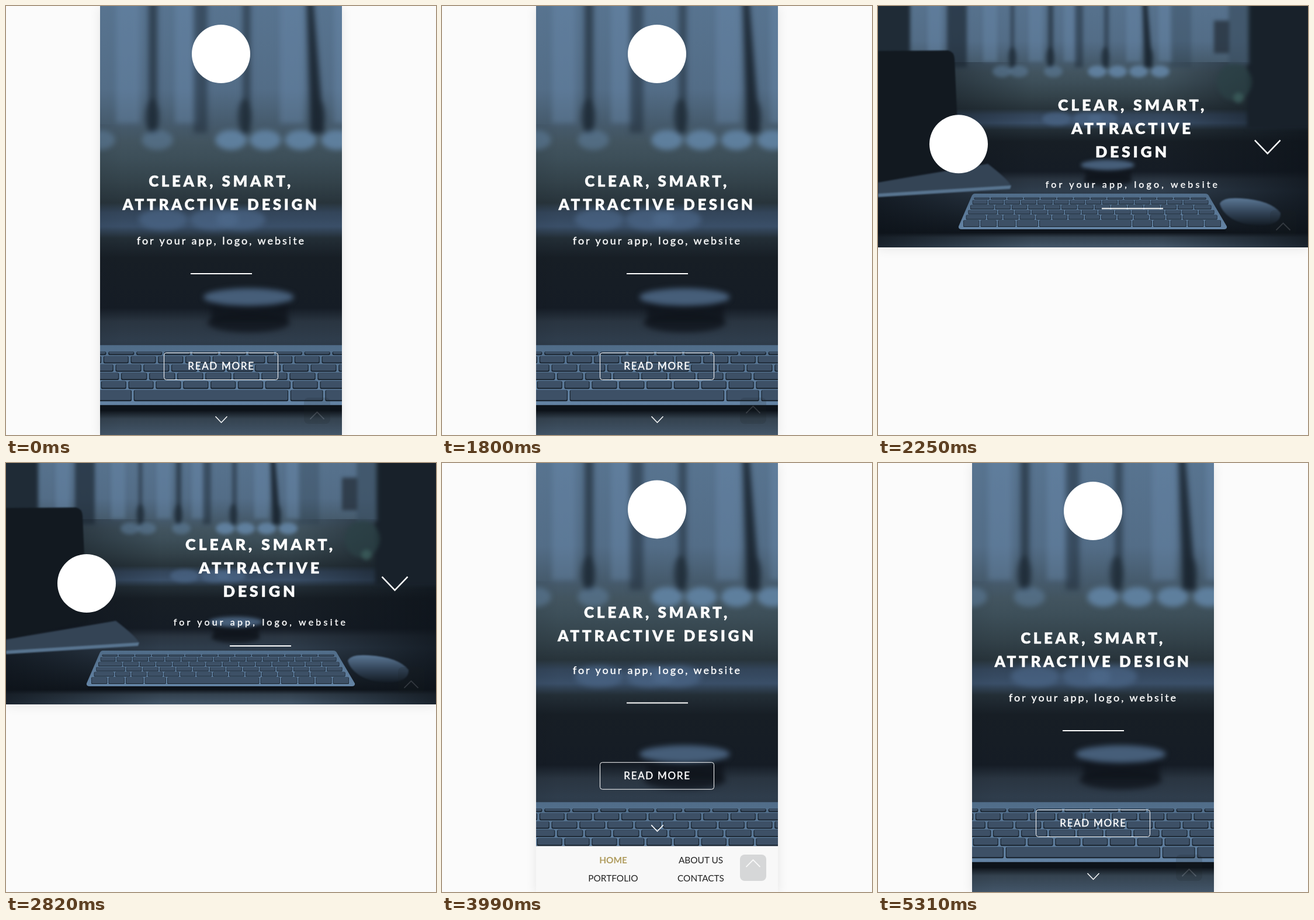
Recreate the animation shown at these times as an HTML page. Size 736 px wide and 734 px high, loop 5400 ms.

```html
<!DOCTYPE html>
<html lang="en">
<head>
<meta charset="utf-8">
<title>Responsive page</title>
<style>
  html, body { margin: 0; width: 100%; height: 100%; overflow: hidden; background: #fbfbfb; }
  #device { position: absolute; top: 0; overflow: hidden; background: #f8f8f8; box-shadow: 0 2px 18px rgba(0, 0, 0, .09); }
  #page { position: absolute; top: 0; display: block; }
  text { font-family: Lato, sans-serif; text-anchor: middle; fill: #fff; }
  .title, .sub, .more { stroke: #fff; stroke-width: .4px; }
  .title { font-weight: 900; letter-spacing: .175em; }
  .sub { font-size: 18px; letter-spacing: 3px; }
  .sub.wide { font-size: 16px; letter-spacing: 4.2px; }
  .more { font-size: 17px; letter-spacing: .1em; }
  .nav text { font-size: 15.4px; fill: #222; }
  .nav .on { font-weight: 700; fill: #b09c5e; }
  .head { font-size: 36px; font-weight: 700; letter-spacing: .2em; fill: #000; }
  .copy { font-size: 16.4px; font-weight: 300; fill: #444; }
  .stroke { fill: none; stroke: #fff; }
  filter { color-interpolation-filters: sRGB; }
</style>
</head>
<body>
<div id="device">
<svg id="page" width="736" height="734">
  <defs>
    <linearGradient id="wall" gradientUnits="userSpaceOnUse" x1="0" y1="-30" x2="0" y2="420"></linearGradient>
    <linearGradient id="sides">
      <stop offset="0" stop-color="#0d131a" stop-opacity=".75"/>
      <stop offset=".36" stop-color="#0d131a" stop-opacity="0"/>
      <stop offset=".66" stop-color="#0d131a" stop-opacity="0"/>
      <stop offset="1" stop-color="#0d131a" stop-opacity=".75"/>
    </linearGradient>
    <linearGradient id="shine" x2="0" y2="1">
      <stop offset="0" stop-color="#5b7795"/>
      <stop offset=".5" stop-color="#34465a"/>
      <stop offset="1" stop-color="#141c25"/>
    </linearGradient>
    <linearGradient id="board" x2="0" y2="1">
      <stop offset="0" stop-color="#506c88"/>
      <stop offset="1" stop-color="#6484a5"/>
    </linearGradient>
    <filter id="soft" filterUnits="userSpaceOnUse" x="-60" y="-90" width="860" height="570">
      <feGaussianBlur stdDeviation="3"/>
    </filter>
    <filter id="faint" filterUnits="userSpaceOnUse" x="-60" y="-90" width="860" height="570">
      <feGaussianBlur stdDeviation="1"/>
    </filter>
  </defs>

  <svg id="hero" width="736">
    <g id="photo">
      <rect x="-60" y="-90" width="860" height="570" fill="url(#wall)"/>
      <rect x="0" y="96" width="736" height="330" fill="url(#sides)"/>
      <g id="blur" filter="url(#soft)"></g>
      <g filter="url(#faint)">
        <path d="M0 77 120 76Q130 78 131 90L139 272 0 302Z" fill="#121920"/>
        <path d="M0 302 188 270Q222 296 228 308L0 322Z" fill="#344455"/>
        <path d="M0 321 228 307 226 313 0 327Z" fill="#58748f"/>
        <path d="M585 338Q590 327 620 329 672 332 689 354 690 372 662 375 628 377 606 364 588 352 585 338Z" fill="url(#shine)"/>
      </g>
      <path d="M138 378 597 378 594 388 141 388Z" fill="#0d131a"/>
      <path id="keys" d="M166 321H560Q565 321 567 326L597 377Q598 382 592 382H143Q137 382 138 377L160 326Q162 321 166 321Z" fill="url(#board)"/>
    </g>
  </svg>

  <g id="about">
    <path d="M161 80.5H575" stroke="#e9e9e9"/>
    <g class="nav">
      <text class="on" x="293" y="30">HOME</text>
      <text x="443" y="30">ABOUT US</text>
      <text x="293" y="61">PORTFOLIO</text>
      <text x="443" y="61">CONTACTS</text>
    </g>
    <text class="head" x="368" y="134">ABOUT</text>
    <path d="M328 170.5H409" stroke="#000"/>
    <text class="copy" x="368" y="218">We specialize in contemporary, functional, and stunning</text>
    <text class="copy" x="368" y="243">websites with design that really brings that "WOW"</text>
  </g>

  <!-- data-k: how far a part follows the height of the hero -->
  <g id="tall">
    <circle data-k=".033" cx="368" cy="82" r="50" fill="#fff"/>
    <g data-k=".564" class="title">
      <text x="368" y="309">CLEAR, SMART,</text>
      <text x="368" y="349">ATTRACTIVE DESIGN</text>
    </g>
    <g data-k=".602">
      <text class="sub" x="368.5" y="408">for your app, logo, website</text>
      <path class="stroke" d="M316 458H421" stroke-width="2"/>
    </g>
    <g data-k="1.031">
      <rect class="stroke" x="270.5" y="593.5" width="195" height="46" rx="4"/>
      <text class="more" x="368.5" y="622">READ MORE</text>
    </g>
  </g>
  <g id="wide">
    <circle data-k=".455" cx="138" cy="206" r="50" fill="#fff"/>
    <g data-k=".455" class="title">
      <text x="435.5" y="149">CLEAR, SMART,</text>
      <text x="435.5" y="189">ATTRACTIVE</text>
      <text x="435.5" y="229">DESIGN</text>
    </g>
    <g data-k=".5">
      <text class="sub wide" x="436" y="278">for your app, logo, website</text>
      <path class="stroke" d="M383 313H488" stroke-width="2"/>
    </g>
  </g>

  <path id="down" class="stroke"/>
  <g id="top" opacity=".15">
    <rect width="45" height="45" rx="8" fill="#1c2226"/>
    <path id="up" class="stroke" d="M10.5 12 22.5 0 34.5 12" stroke-width="1.8"/>
  </g>
</svg>
</div>
<script>
const LOOP = 5400, TURN = 1820, BACK = 3590, TALL = 734, LOW = 413;
const $ = id => document.getElementById(id);

function add(parent, tag, attrs) {
  const el = document.createElementNS('http://www.w3.org/2000/svg', tag);
  for (const name in attrs) el.setAttribute(name, attrs[name]);
  parent.append(el);
}

const tones = [[-30, '#587490'], [60, '#536d87'], [95, '#465b6d'], [114, '#42545f'], [130, '#3d4f59'],
  [155, '#33424a'], [176, '#28343b'], [186, '#33455a'], [200, '#3a4f68'], [212, '#232e36'],
  [232, '#171e25'], [283, '#151c25'], [297, '#2a3541'], [316, '#2f3d4c'], [388, '#10161d'],
  [396, '#34424f'], [420, '#4a5f75']];
for (const [y, c] of tones) add($('wall'), 'stop', { offset: (y + 30) / 450, 'stop-color': c });

function paintRoom() {
  const blur = $('blur');
  const box = (x, y, width, height, fill, opacity = 1) => add(blur, 'rect', { x, y, width, height, fill, opacity });
  const spot = (cx, cy, rx, ry, fill, opacity = 1) => add(blur, 'ellipse', { cx, cy, rx, ry, fill, opacity });

  box(-60, -90, 115, 190, '#1f2b36');
  box(632, -90, 160, 300, '#18212a');
  box(600, -90, 36, 190, '#3b4f62', .7);
  box(575, 25, 26, 56, '#27333e', .8);
  for (const x of [85, 180, 258, 318, 425, 480]) box(x, -90, 24, 185, '#6c8daf', .4);
  // dark folds: x, width, opacity
  for (const [x, w, o] of [[118, 34, .7], [227, 6, .6], [291, 9, .65], [337, 14, .5], [387, 8, .55], [500, 36, .2]])
    box(x, -90, w, 195, '#1d2934', o);
  add(blur, 'path', { d: 'M452-40H458L470 105H456Z', fill: '#121b24', opacity: .8 });
  for (const x of [230, 295, 389, 464]) spot(x, 88, 7, 18, '#1d2934', .7);
  for (const x of [212, 241, 300, 375, 410, 446, 483]) spot(x, 112, 16, 10, '#668aad', x > 350 ? .8 : .45);
  spot(610, 130, 30, 32, '#2c4246', .7);
  spot(617, 157, 9, 9, '#3d6260', .7);
  for (const x of [306, 358, 385]) spot(x, 193, 25, 11, '#4f6c8e', .6);
  box(355, 277, 78, 20, '#0f151c', .8);
  spot(393, 298, 42, 10, '#0f151c', .8);
  spot(393, 272, 46, 9, '#465e79');
}

function paintKeys() {
  const rows = [327, 331.5, 340, 348.5, 357, 366, 378.5];
  const ends = [[1, 1], [1, 1.6], [1.5, 1.1], [1.8, 1], [1.3, 2.2]];
  for (let r = 0; r < 6; r++) {
    const y = rows[r], h = rows[r + 1] - y, mid = y + h / 2 - 322;
    const left = 167 - mid * .43, right = 559 + mid * .59;
    const sizes = r < 5 ? [ends[r][0], ...Array(12).fill(1), ends[r][1]] : [1, 1, 1.1, 1.3, 5.4, 1.2, 1, 1, 1, 1];
    const unit = (right - left) / sizes.reduce((a, b) => a + b);
    let x = left;
    for (const size of sizes) {
      const width = size * unit - 3.6;
      add($('photo'), 'rect', { x: x + .6, y: y + .6, width: width + 1.4, height: h - 1, rx: 1.5, fill: '#18222d' });
      add($('photo'), 'rect', { x: x + 1.3, y: y + .5, width, height: h - 2, rx: 1.3, fill: '#3d5066' });
      x += size * unit;
    }
  }
}

// cubic-bezier(.25, .1, .25, 1)
function ease(x) {
  if (x <= 0) return 0;
  if (x >= 1) return 1;
  const curve = (a, b, u) => 3 * a * u * (1 - u) ** 2 + 3 * b * u * u * (1 - u) + u ** 3;
  let lo = 0, hi = 1;
  for (let i = 0; i < 22; i++) {
    const u = (lo + hi) / 2;
    if (curve(.25, .25, u) < x) lo = u; else hi = u;
  }
  return curve(.1, 1, lo);
}

const mix = (a, b, k) => a + (b - a) * k;
const wave = (t, period) => (1 - Math.cos(2 * Math.PI * t / period)) / 2;
const move = (el, x, y) => el.setAttribute('transform', `translate(${x} ${y})`);
const parts = document.querySelectorAll('[data-k]');
const titles = document.querySelectorAll('.title');

function draw(t) {
  const wide = t >= TURN && t < BACK;
  // 0 is the tall layout, 1 the wide one
  const blend = time => t < BACK ? ease((t - TURN) / time) : 1 - ease((t - BACK) / time);
  const k = blend(880), size = blend(500);
  const height = mix(TALL, LOW, k);
  const left = wide ? 0 : 161, width = wide ? 736 : 414, view = wide ? LOW : TALL;
  const rest = height - view;

  Object.assign($('device').style, { left: left + 'px', width: width + 'px', height: view + 'px' });
  $('page').style.left = -left + 'px';
  $('hero').setAttribute('height', height);
  $('photo').setAttribute('transform', wide ? '' : 'matrix(1.68 0 0 1.68 -245 41)');
  $('tall').style.display = wide ? 'none' : '';
  $('wide').style.display = wide ? '' : 'none';
  $('about').style.display = wide ? 'none' : '';
  move($('about'), 0, height);
  for (const el of parts) move(el, 0, el.dataset.k * rest);
  for (const el of titles) el.style.fontSize = mix(26, 27, k) + 'px';

  const half = mix(10, 22, size), drop = half * .52;
  const x = wide ? 665.5 + (1 - k) * 6 : 368.5;
  const y = (wide ? 215.7 + rest * .455 : height - 26.5) - 10 * wave(t, 1800);
  $('down').setAttribute('d', `M${x - half} ${y - drop}L${x} ${y + drop}L${x + half} ${y - drop}`);
  $('down').setAttribute('stroke-width', mix(1.5, 2.5, size));

  move($('top'), left + width - 65, view - 64);
  move($('up'), 0, 25 - 16 * wave(t + 100, 2700));
}

paintRoom();
paintKeys();
(function tick() {
  draw(performance.now() % LOOP);
  requestAnimationFrame(tick);
})();
</script>
</body>
</html>
```
